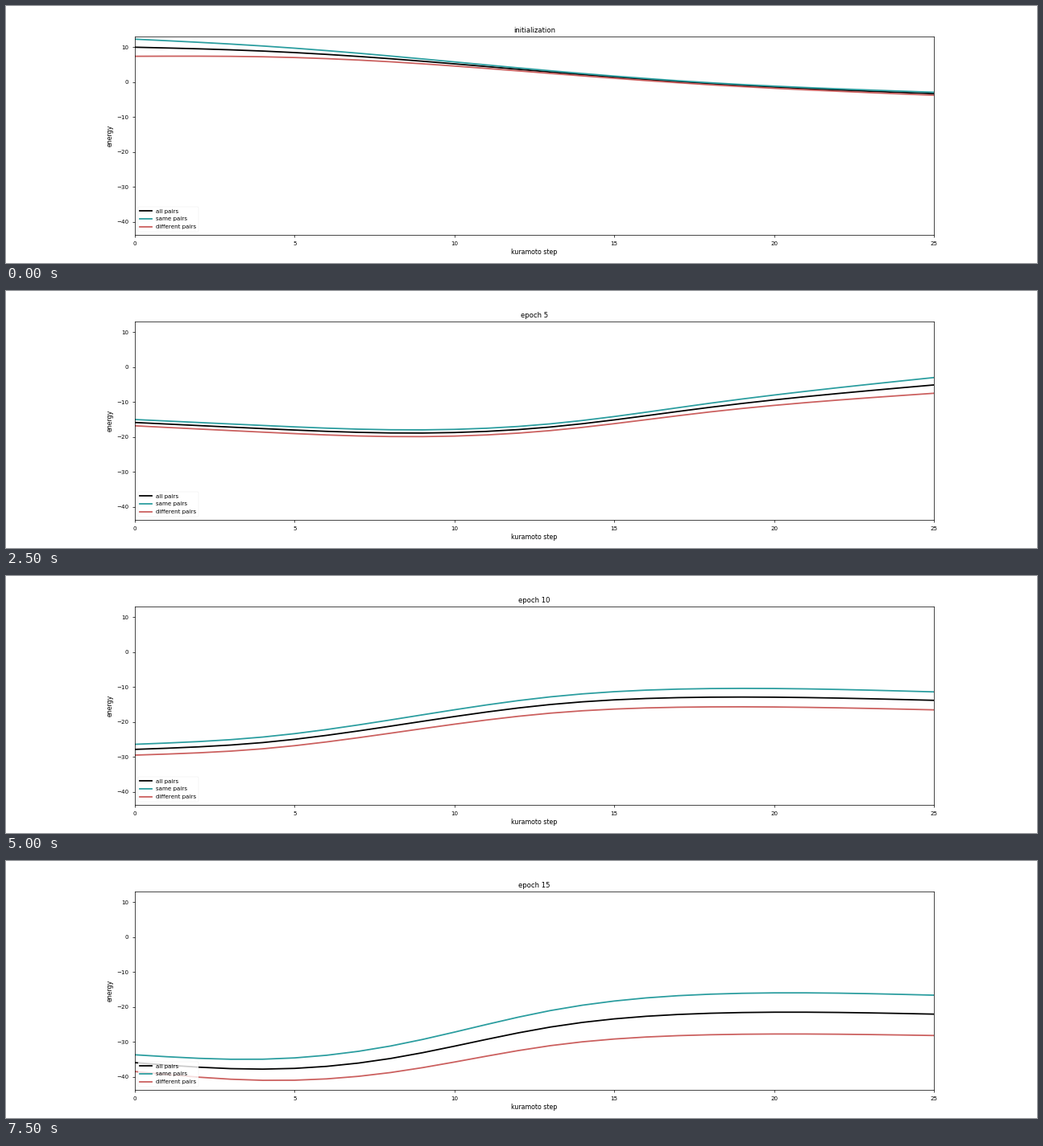
Animation of 1280 by 320 pixels, one loop 8000 ms. Source, as a matplotlib script:

```python
import numpy as np
import matplotlib.pyplot as plt
from matplotlib.animation import FuncAnimation

plt.rcParams.update({
    "font.family": "DejaVu Sans",
    "axes.titlesize": 9.6, "axes.labelsize": 8.8, "axes.linewidth": 0.8,
    "xtick.labelsize": 8, "ytick.labelsize": 8, "legend.fontsize": 8,
    "xtick.major.pad": 5.6, "ytick.major.pad": 5.6,
    "patch.linewidth": 0.24,
})

EPOCHS = 16
STEPS = np.arange(26)


def spline(knots, values):
    """Natural cubic spline through a few points, sampled at every step."""
    k = np.array(knots, float)
    line = np.vander(k, 2)
    bumps = np.abs(k[:, None] - k) ** 3
    system = np.block([[bumps, line], [line.T, np.zeros((2, 2))]])
    w = np.linalg.solve(system, [*values, 0, 0])
    return np.hstack([np.abs(STEPS[:, None] - k) ** 3,
                      np.vander(STEPS, 2)]) @ w


def pose(mean, gap):
    return np.array([spline([0, 4, 8, 13, 18, 25], mean),
                     spline([0, 8, 16, 25], gap)])


# Key epochs: mean energy, and the gap between same and different pairs
KEYS = {
    0: pose([10, 8.9, 6.7, 2.9, -0.45, -3.3], [4.9, 1.65, 0.6, 0.85]),
    2: pose([-10.55, -12.3, -12.8, -10.75, -7.5, -3], [1, -0.2, -0.15, 0.55]),
    5: pose([-15.85, -17.6, -18.85, -17.15, -11.5, -5.1], [1.8, 1.95, 2.15, 4.5]),
    8: pose([-35.45, -33.05, -28.25, -20.25, -14.8, -14.9], [5, 4.8, 6.8, 6.4]),
    10: pose([-27.85, -25.9, -21.2, -15, -12.9, -13.8], [3.1, 3.8, 5.1, 5.15]),
    13: pose([-33.9, -35.85, -31.85, -22.55, -19.5, -20.6], [4.5, 6.3, 9.2, 11.8]),
    15: pose([-35.95, -37.8, -34.75, -25.75, -21.8, -22.05], [4.8, 7.6, 11.2, 11.55]),
}


def energies(epoch):
    a = max(k for k in KEYS if k <= epoch)
    b = min(k for k in KEYS if k >= epoch)
    t = ((epoch - a) / max(b - a, 1)) ** 1.5
    mean, gap = (1 - t) * KEYS[a] + t * KEYS[b]
    return mean, mean + 0.47 * gap, mean - 0.53 * gap


fig, ax = plt.subplots(figsize=(20, 5), dpi=64)
styles = [("all pairs", "black"), ("same pairs", "#2a9d9f"),
          ("different pairs", "#cb5f5e")]
lines = [ax.plot([], [], color=c, lw=2, label=name)[0] for name, c in styles]
ax.set(xlim=(0, 25), ylim=(-43.7, 12.97), xticks=range(0, 26, 5),
       yticks=range(-40, 11, 10), xlabel="kuramoto step", ylabel="energy")
ax.legend(loc="lower left", labelspacing=0.55)
title = ax.set_title("")


def update(epoch):
    for line, y in zip(lines, energies(epoch)):
        line.set_data(STEPS, y)
    title.set_text(f"epoch {epoch}" if epoch else "initialization")
    return [*lines, title]


anim = FuncAnimation(fig, update, frames=EPOCHS, interval=500,
                     repeat=True, repeat_delay=0)
plt.show()
```
